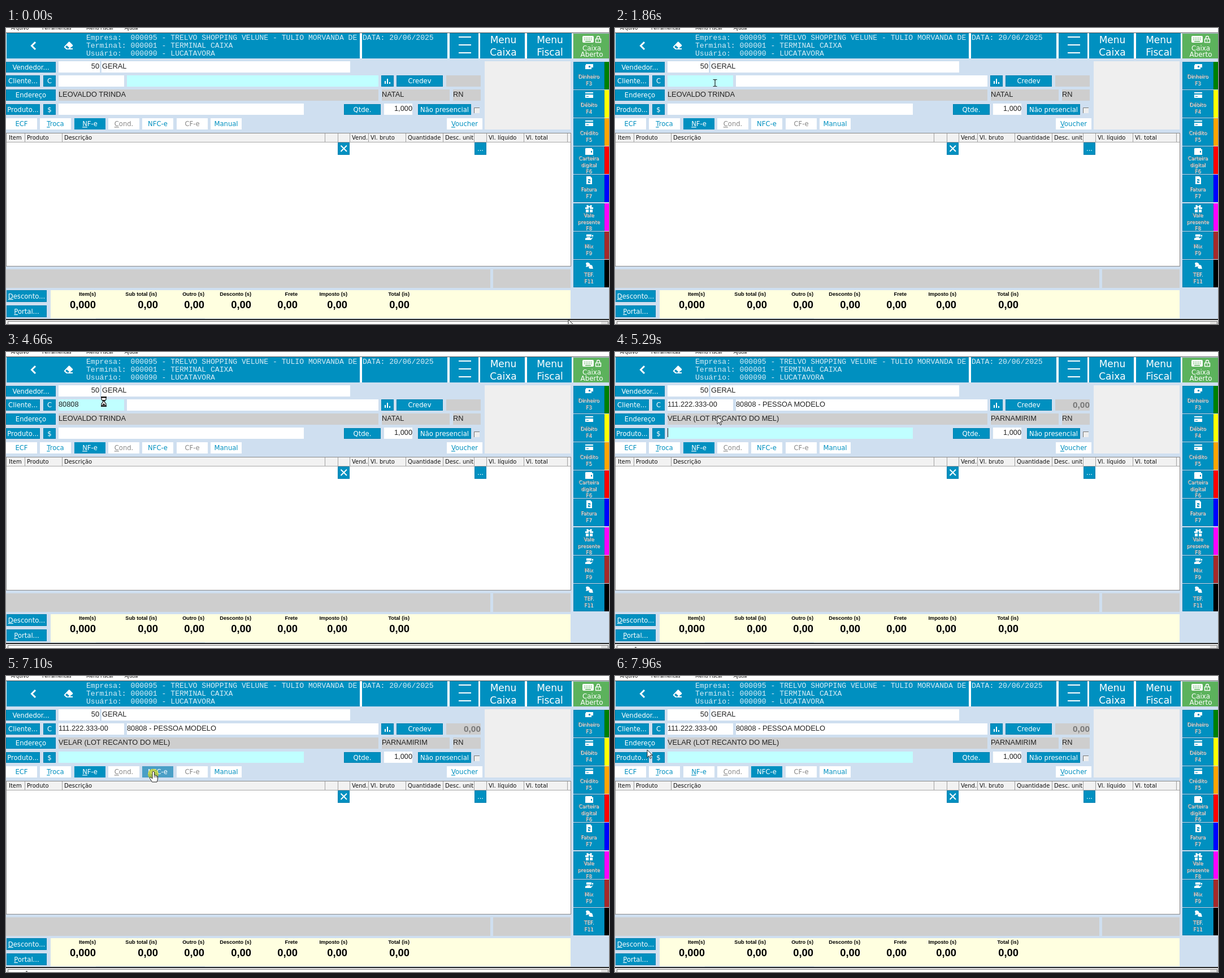
Animation, 1067 px wide and 525 px high, one loop 8000 ms. Source, as an HTML page:

```html
<!DOCTYPE html>
<html lang="pt-BR">
<head>
<meta charset="utf-8">
<style>
html, body { margin: 0; width: 100%; height: 100%; overflow: hidden; background: #cfdff0; }
svg { display: block; }
text { white-space: pre; }
.ui { font-family: "DejaVu Sans", sans-serif; }
.field { font: 12.8px "Liberation Sans", sans-serif; fill: #222; }
.bold { font-family: "Liberation Sans", sans-serif; font-weight: bold; }
.mono { font: 13.1px "Liberation Mono", monospace; fill: #d8edf6; }
</style>
</head>
<body>
<svg id="stage" width="1067" height="525" viewBox="0 0 1067 525"></svg>
<script>
const BLUE = '#0090c0', EDGE = '#007fae', BG = '#cfdff0', GRAY = '#cecece', CYAN = '#c0ffff', HOVER = '#4a9fc6';
const stage = document.getElementById('stage');
const out = [];

const rect = (x, y, x2, y2, fill, extra = '') =>
  out.push(`<rect x="${x}" y="${y}" width="${x2 - x}" height="${y2 - y}" fill="${fill}" ${extra}/>`);
const path = (d, fill, stroke = 'none', width = 1) =>
  out.push(`<path d="${d}" fill="${fill}" stroke="${stroke}" stroke-width="${width}"/>`);
const text = (x, y, s, cls, extra = '') =>
  out.push(`<text x="${x}" y="${y}" class="${cls}" ${extra}>${s}</text>`);
const ui = (x, y, s, size, fill, anchor = 'start', extra = '') =>
  text(x, y, s, 'ui', `font-size="${size}" fill="${fill}" text-anchor="${anchor}" ${extra}`);
// "_" before a letter underlines it
const label = s => s.replace(/_(.)/, '<tspan text-decoration="underline">$1</tspan>');
const button = (x, y, x2, y2, s, fill = BLUE, color = '#fff', id = '') => {
  rect(x, y, x2, y2, fill, id && `id="${id}"`);
  if (fill == BLUE) rect(x + 0.5, y + 0.5, x2 - 0.5, y2 - 0.5, 'none', `stroke="${EDGE}"`);
  ui((x + x2) / 2, (y + y2) / 2 + 4.3, label(s), 11.6, color, 'middle', id && `id="${id}T"`);
};
const field = (x, y, x2, fill, s = '', id = '') => {
  rect(x, y, x2, y + 20, fill, id && `id="${id}"`);
  text(x, y + 13, s, 'field', id && `id="${id}T"`);
};

// Menu strip
rect(0, 0, 1067, 8, '#fff');
[[9, 'Arquivo'], [64, 'Ferramentas'], [142, 'Menu Fiscal'], [210, 'Ajuda']].forEach(([x, s]) =>
  ui(x, 3, s, 8.2, '#111'));
rect(0, 8, 1067, 9, '#555');

// Header
rect(0, 9, 1003, 54, '#fff');
[[1, 626], [630, 781], [785, 836], [839, 918], [922, 1001]].forEach(([a, b]) => rect(a, 9, b, 54, BLUE));
path('M52 25L45.500 31.500L52 38', 'none', '#fff', 3);
path('M103 33L111 24.5Q112 24 113 25L118 30Q118.500 31 118 32L113 36H118V38H107L103 34.500Q102.500 33.500 103 33ZM105 33.500L108.500 36.500H110.500L112 35L107.500 31Z', '#fff');
['Empresa:  000095 - TRELVO SHOPPING VELUNE - TULIO MORVANDA DE',
 'Terminal: 000001 - TERMINAL CAIXA',
 'Usuário:  000090 - LUCATAVORA'].forEach((s, i) => text(142, 21 + i * 14, s, 'mono'));
text(631, 21, 'DATA: 20/06/2025', 'mono');
[15, 29, 43].forEach(y => rect(801, y, 823, y + 2, '#fff'));
[[880, 'Caixa'], [962.5, 'Fiscal']].forEach(([x, s]) => {
  ui(x, 27, 'Menu', 17, '#fff', 'middle');
  ui(x, 49, s, 17, '#fff', 'middle');
});
rect(1004, 10, 1067, 54, '#5cb25c');
rect(1020, 14, 1040, 26, '#fff', 'rx="2"');
for (let i = 0; i < 10; i++) rect(1023 + i % 5 * 3, 17 + (i / 5 | 0) * 3, 1024.5 + i % 5 * 3, 18.5 + (i / 5 | 0) * 3, '#5cb25c');
rect(1025, 23, 1035, 24.500, '#5cb25c');
path('M1043.500 19.500H1052.500V25.500H1043.500ZM1045.500 19V17A2.500 2.500 0 0 1 1050.500 17V19M1048 21.500V23.500', 'none', '#fff', 1.4);
ui(1036.5, 40, 'Caixa', 11.9, '#fff', 'middle');
ui(1036.5, 51, 'Aberto', 11.9, '#fff', 'middle');

// Form
rect(847, 59, 999, 180, '#efefef');
button(0, 60, 88, 79, 'Vendedor...');
field(93, 59, 609, '#fff');
rect(166, 59, 169, 79, BG);
text(165, 72, '50', 'field', 'text-anchor="end"');
text(170, 72, 'GERAL', 'field');
button(0, 84, 60, 104, 'Cliente...');
button(66, 84, 88, 104, 'C');
field(93, 84, 209, '#fff', '', 'code');
field(214, 84, 659, CYAN, '', 'client');
button(664, 84, 686, 104, '');
[[670, 94], [674, 90], [678, 96]].forEach(([x, y]) => rect(x, y, x + 2, 99, '#fff'));
button(691, 84, 773, 104, 'Credev');
rect(779, 84, 840, 104, GRAY);
text(840, 99, '', 'bold', 'id="credit" font-size="15.4" fill="#777" text-anchor="end"');
button(0, 109, 88, 129, 'Endereço');
field(93, 109, 659, GRAY, '', 'street');
field(665, 109, 785, GRAY, '', 'city');
field(791, 109, 840, GRAY, 'RN');
button(0, 135, 60, 154, 'Produto...');
button(66, 135, 88, 154, '$');
field(93, 134, 527, '#fff', '', 'product');
button(598, 135, 663, 154, 'Qtde.');
field(669, 134, 719, '#fff');
text(719, 147, '1,000', 'field', 'text-anchor="end"');
button(729, 135, 823, 154, 'Não presencial');
rect(829, 142, 838, 151, '#eee');
path('M828.500 151V141.500H838', 'none', '#777');

// Document tabs
[['ECF'], ['_Troca'], ['_NF-e', BLUE, 'nfe'], ['_Cond.', '#888'], ['NFC-e', BLUE, 'nfce'], ['CF-e', '#888'], ['Manual']]
  .forEach(([s, color = BLUE, id], i) => button(Math.round(i * 60.3), 160, Math.round(i * 60.3 + 55), 180, s, '#fff', color, id));
button(780, 160, 843, 180, '_Voucher', '#fff', BLUE);

// Grid
rect(0, 186, 1000, 423, '#8a8a8a');
rect(1, 187, 999, 422, '#fff');
rect(1, 187, 999, 202, '#f2f2f2');
rect(1, 202, 999, 203, '#a8a8a8');
[33, 99, 564, 587, 608, 641, 707, 773, 828, 850, 916, 993].forEach(x => rect(x, 187, x + 1, 202, '#a0a0a0'));
[[5, 'Item'], [37, 'Produto'], [103, 'Descrição'], [612, 'Vend.'], [645, 'Vl. bruto'], [711, 'Quantidade'],
 [777, 'Desc. unit'], [854, 'Vl. líquido'], [920, 'Vl. total']].forEach(([x, s]) => ui(x, 198, s, 10, '#111'));
button(587, 203, 608, 225, '');
path('M592.500 208.500L603 219M603 208.500L592.500 219', 'none', '#fff', 2);
button(829, 203, 850, 225, '...');

// Totals
rect(0, 428, 857, 461, GRAY);
rect(862, 428, 999, 461, GRAY);
rect(79, 465, 999, 515, '#ffffe0');
button(1, 465, 72, 486, '_Desconto...');
button(1, 492, 72, 513, '_Portal...');
[['Item(s)', 159], ['Sub total (is)', 267], ['Outro (s)', 351], ['Desconto (s)', 434], ['Frete', 516], ['Imposto (s)', 604], ['Total (is)', 714]]
  .forEach(([s, x], i) => {
    text(x, 475, s, 'bold', 'font-size="9.2" text-anchor="end"');
    text(i == 1 ? 269 : x, 497, i ? '0,00' : '0,000', 'bold', 'font-size="18.4" text-anchor="end"');
  });
rect(159, 515, 352, 516, '#b8cfe6');
rect(0, 516, 1067, 518, '#222');
rect(0, 518, 1067, 525, '#f0f0f0');
rect(3, 520, 1066, 525, '#777');
rect(4, 521, 1065, 525, '#fff');
rect(1053, 521, 1065, 525, '#e4e4e4');
rect(35, 523, 38, 525, '#888', 'id="status"');

// Payment buttons
const icons = [
  'M1026 64H1039V70H1036V73H1025V66H1026ZM1031 67V70H1034V67Z',
  'M1025 114H1039V116H1025ZM1025 118H1039V124H1025ZM1027 121V122H1031V121Z',
  'M1025 164H1039V166H1025ZM1025 168H1039V174H1025ZM1027 171V172H1031V171Z',
  'M1026 213H1037V215H1039V225H1025V214ZM1035 218V221H1037V218Z',
  'M1027 263H1034L1037 266V277H1027ZM1030 268V270H1033V271H1030V275H1034V273H1031V272H1034V268Z',
  'M1025 318H1028Q1026 314 1029 314Q1031 314 1032 317Q1033 314 1035 314Q1038 314 1036 318H1039V321H1033V318H1031V321H1025ZM1026 322H1031V327H1026ZM1033 322H1038V327H1033Z',
  'M1027 366H1036V370H1027ZM1037 367H1039V370H1037ZM1025 373L1029 371H1034V373H1031L1035 373L1039 371L1035 376H1025Z',
  'M1026 417A4 3.500 0 1 1 1032 423L1026 424L1027 421ZM1034 420A4 3.500 0 0 1 1038 424L1039 427H1035A4 3.500 0 0 1 1031 425Z'
];
[['Dinheiro F3', 'green'], ['Débito F4', '#ff0'], ['Crédito F5', 'orange'], ['Carteira digital F6', 'red'],
 ['Fatura F7', 'blue'], ['Vale presente F8', '#f0f'], ['Mix F9', 'brown'], ['TEF. F11', '#000']].forEach(([s, color], i) => {
  const y = Math.round(59.6 + i * 50.2), words = s.split(' ');
  rect(1004, y, 1059, y + 49, BLUE);
  rect(1004.5, y + 0.5, 1058.5, y + 48.5, 'none', `stroke="${EDGE}"`);
  rect(1059, y, 1067, y + 49, color);
  path(icons[i], '#fff');
  words.forEach((w, k) => {
    const base = y + (words.length > 2 ? 24 + k * 11.5 : 29 + k * 12);
    ui(1032, base + 1, w, 8.9, '#fff', 'middle');
    ui(1031, base, w, 8.9, '#a08880', 'middle');
  });
});

// Caret, click spot and pointers
rect(0, 0, 1, 16, '#111', 'id="caret"');
out.push(`<circle id="spot" r="9.500" fill="#e8e000" fill-opacity=".6"/>
<g id="arrow"><path d="M0 0V13.500L3.200 10.500L5.400 15.500L7.500 14.500L5.300 9.700H9.500Z" fill="#fff" stroke="#222"/></g>
<g id="beam"><path d="M-3.500 -5.500H-1L0 -4.500L1 -5.500H3.500M0 -4.500V5.500M-3.500 6.500H-1L0 5.500L1 6.500H3.500" fill="none" stroke="#222" stroke-width="1.200"/></g>
<g id="glass"><path d="M-4 -7V-4L-1 0L-4 4V7H4V4L1 0L4 -4V-7Z" fill="#fff" stroke="#111" stroke-width="1.200"/><path d="M-5 -8H5M-5 8H5" stroke="#111" stroke-width="2"/><path d="M-2.500 -3H2.500L0 0ZM-3 6L0 3L3 6Z" fill="#111"/></g>
<g id="hand"><path d="M-1.500 0Q0 -2 1.500 0V6Q3 5 4 6.500Q5.500 6 6 7.500Q7.500 7 7.500 9V13L6 18H-2.500L-6.500 11.500Q-7.500 9 -5 9.500L-2 12V0Z" fill="#fff" stroke="#222"/><path d="M1.500 6V10M4 7V10M6 8V10" stroke="#222" stroke-width=".8"/></g>`);
stage.innerHTML = out.join('');

const $ = id => document.getElementById(id);
const show = (id, on) => $(id).setAttribute('visibility', on ? 'visible' : 'hidden');
const fill = (id, color) => $(id).setAttribute('fill', color);
const put = (id, s) => { if ($(id).textContent != s) $(id).textContent = s; };
const move = (id, x, y) => $(id).setAttribute('transform', `translate(${x} ${y})`);
const within = (t, a, b) => t >= a && t < b;

// Pointer stops: time, x, y
const stops = [
  [0, 995, 517], [70, 995, 517], [860, 178, 100], [1089, 178, 100], [1090, 177, 97], [2389, 177, 97],
  [2390, 180, 104], [4279, 180, 104], [4280, 173, 88], [4660, 173, 88], [5290, 181, 114], [5450, 183, 116],
  [5510, 183, 116], [6310, 244, 179], [6390, 245, 178], [6720, 261, 170], [7510, 261, 170], [7960, 57, 131], [8000, 57, 131]
];
// Pointer shapes: start time, shape
const shapes = [[0, 'arrow'], [800, 'beam'], [2320, ''], [2390, 'beam'], [2710, ''], [4280, 'glass'], [5210, 'arrow'], [6480, 'hand'], [7560, 'arrow']];
const keys = [2320, 2710, 3030, 3330, 3670];
const caretOn = [[1315, 1860], [2320, 4130], [5280, 5800], [6310, 6870], [7280, 7780]];

function pointer(t) {
  const i = stops.findIndex(s => s[0] > t), a = stops[i - 1], b = stops[i];
  const p = (t - a[0]) / (b[0] - a[0]), e = p * p * (3 - 2 * p);
  return [a[1] + (b[1] - a[1]) * e, a[2] + (b[2] - a[2]) * e];
}

function draw(t) {
  const loaded = t >= 5130, typed = keys.filter(k => t >= k).length;
  put('codeT', loaded ? '111.222.333-00' : '80808'.slice(0, typed));
  put('clientT', loaded ? '80808 - PESSOA MODELO' : '');
  put('streetT', loaded ? 'VELAR (LOT RECANTO DO MEL)' : 'LEOVALDO TRINDA');
  put('cityT', loaded ? 'PARNAMIRIM' : 'NATAL');
  put('credit', loaded ? '0,00' : '');
  fill('code', within(t, 1315, 5130) ? CYAN : '#fff');
  fill('client', t < 1315 ? CYAN : '#fff');
  fill('product', t >= 5280 && !within(t, 7190, 7280) ? CYAN : '#fff');

  const picked = t >= 7190, hover = within(t, 6390, 7560);
  fill('nfe', picked ? '#fff' : BLUE);
  fill('nfeT', picked ? BLUE : '#fff');
  fill('nfce', hover ? HOVER : picked ? BLUE : '#fff');
  fill('nfceT', hover || picked ? '#fff' : BLUE);
  show('status', within(t, 5210, 7190));

  show('caret', caretOn.some(([a, b]) => within(t, a, b)));
  move('caret', 93 + (loaded ? 0 : typed * 7.1), loaded ? 135 : 85);

  const [x, y] = pointer(t), shape = shapes.filter(s => s[0] <= t).pop()[1];
  ['arrow', 'beam', 'glass', 'hand'].forEach(id => {
    show(id, id == shape);
    move(id, x, y);
  });
  show('spot', within(t, 1230, 1400) || within(t, 7100, 7280));
  move('spot', x - 0.5, t < 4000 ? y : y + 4);
}

const start = performance.now();
function tick(now) {
  draw(Math.max(0, now - start) % 8000);
  requestAnimationFrame(tick);
}
draw(0);
requestAnimationFrame(tick);
</script>
</body>
</html>
```
